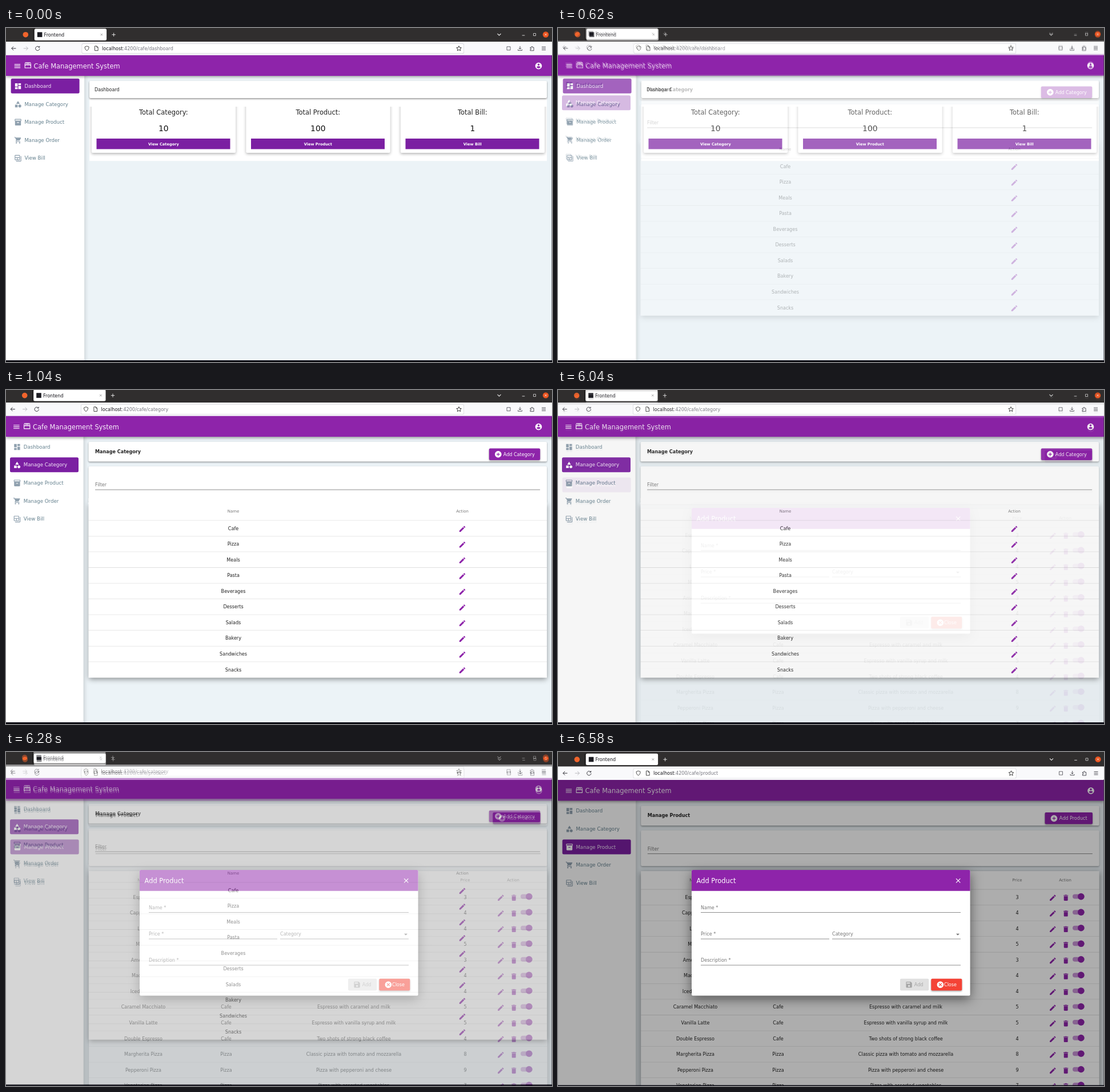
Recreate the animation shown at these times as an HTML page with a canvas. Size 956x586 px, loop 8000 ms.

```html
<!DOCTYPE html>
<html lang="en">
<head>
<meta charset="utf-8">
<title>Cafe Management System</title>
<style>
html, body { margin: 0; width: 100%; height: 100%; overflow: hidden; }
canvas { display: block; }
</style>
</head>
<body>
<canvas id="stage" width="956" height="586"></canvas>
<script>
const W = 956, H = 586, LOOP = 8000, STEP = 60, STEPS = 10;
const PURPLE = '#8e24aa', DEEP = '#7b1fa2', INK = 'rgba(0,0,0,.87)', HINT = 'rgba(0,0,0,.54)';
const ROW = 27.56;

// Icons on a 24 unit grid
const ROUND = 'M12 2C6.48 2 2 6.48 2 12s4.48 10 10 10 10-4.48 10-10S17.52 2 12 2z';
const CROSS = 'M19 6.41L17.59 5 12 10.59 6.41 5 5 6.41 10.59 12 5 17.59 6.41 19 12 13.41 17.59 19 19 17.59 13.41 12z';
const ICONS = {
  dashboard: 'M3 13h8V3H3zM3 21h8v-6H3zM13 21h8V11h-8zM13 3v6h8V3z',
  category: 'M12 2l-5.5 9h11zM3 13.5h8v8H3zM17.5 13a4.5 4.5 0 1 0 .01 0z',
  product: 'M20 2H4c-1 0-2 .9-2 2v3c0 .7.4 1.3 1 1.7V20c0 1.1 1.1 2 2 2h14c.9 0 2-.9 2-2V8.7c.6-.4 1-1 1-1.7V4c0-1.1-1-2-2-2zM15 14H9v-2h6zM20 7H4V4h16z',
  order: 'M7 18a2 2 0 1 0 .01 0zM17 18a2 2 0 1 0 .01 0zM1 2v2h2l3.6 7.6-1.35 2.4c-.7 1.4.3 3 1.75 3h12v-2H7.4l-.2-.4.9-1.6h7.45c.75 0 1.4-.4 1.75-1l3.6-6.5c.3-.7-.2-1.5-.9-1.5H5.2l-.9-2z',
  bill: 'M20 6v14H6v2h14c1.1 0 2-.9 2-2V6zM16 2H4c-1.1 0-2 .9-2 2v12c0 1.1.9 2 2 2h12c1.1 0 2-.9 2-2V4c0-1.1-.9-2-2-2zM9 16H4v-5h5zM16 16h-5v-5h5zM16 9H4V4h12z',
  account: ROUND + 'M12 5a3 3 0 1 1-.01 0zM12 19.2c-2.5 0-4.7-1.3-6-3.2 0-2 4-3.1 6-3.1s6 1.1 6 3.1c-1.3 1.9-3.5 3.2-6 3.2z',
  edit: 'M3 17.25V21h3.75L17.8 9.94l-3.75-3.75zM20.7 7c.4-.4.4-1 0-1.4l-2.3-2.3c-.4-.4-1-.4-1.4 0l-1.9 1.8 3.75 3.75z',
  trash: 'M6 19c0 1.1.9 2 2 2h8c1.1 0 2-.9 2-2V7H6zM19 4h-3.5l-1-1h-5l-1 1H5v2h14z',
  add: ROUND + 'M17 13h-4v4h-2v-4H7v-2h4V7h2v4h4z',
  cancel: ROUND + 'M17 15.6L15.6 17 12 13.4 8.4 17 7 15.6l3.6-3.6L7 8.4 8.4 7l3.6 3.6L15.6 7 17 8.4 13.4 12z',
  save: 'M17 3H5c-1.1 0-2 .9-2 2v14c0 1.1.9 2 2 2h14c1.1 0 2-.9 2-2V7zM12 19a3 3 0 1 1 .01 0zM15 9H5V5h10z',
  menu: 'M3 18h18v-2H3zM3 13h18v-2H3zM3 6v2h18V6z',
  close: CROSS
};
const LINES = {
  store: 'M4 3.5h16l1.5 6v11h-19v-11zM2.5 9.5q2.5 4 5 0q2.3 4 4.5 0q2.3 4 4.5 0q2.5 4 5 0M9 3.5l-1.5 6M12 3.5v6M15 3.5l1.5 6',
  back: 'M20 12H4M11 5l-7 7 7 7',
  forward: 'M4 12h16M13 5l7 7-7 7',
  reload: 'M18.5 7.5a8 8 0 1 0 1.5 5M19.5 3v5h-5',
  shield: 'M12 3l8 3c0 7-2 12-8 15c-6-3-8-8-8-15z',
  page: 'M6 3h8l5 5v13H6zM14 3v5h5',
  star: 'M12 3l2.7 6 6.3.6-4.8 4.3 1.5 6.4-5.7-3.4-5.7 3.4 1.5-6.4L3 9.600l6.300-.6z',
  square: 'M4 4h16v16H4z',
  download: 'M12 3v12M7 10l5 5 5-5M4 16v4h16v-4',
  puzzle: 'M5 8h5v-2a2 2 0 0 1 4 0v2h5v13H5v-5h2a2 2 0 0 0 0-4H5z',
  bars: 'M4 6h16M4 12h16M4 18h16',
  cross: 'M5 5l14 14M19 5L5 19',
  plus: 'M12 3v18M3 12h18',
  chevron: 'M4 8l8 8 8-8',
  dash: 'M4 17h16'
};

const NAV = [['dashboard', 'Dashboard'], ['category', 'Manage Category'], ['product', 'Manage Product'],
  ['order', 'Manage Order'], ['bill', 'View Bill']];
const CATEGORIES = ['Cafe', 'Pizza', 'Meals', 'Pasta', 'Beverages', 'Desserts', 'Salads', 'Bakery', 'Sandwiches', 'Snacks'];
const PRODUCTS = [
  ['Espresso', 3], ['Cappuccino', 4], ['Latte', 4], ['Mocha', 5], ['Americano', 3], ['Macchiato', 4], ['Iced Coffee', 4],
  ['Caramel Macchiato', 5, 'Cafe', 'Espresso with caramel and milk'],
  ['Vanilla Latte', 5, 'Cafe', 'Espresso with vanilla syrup and milk'],
  ['Double Espresso', 4, 'Cafe', 'Two shots of strong black coffee'],
  ['Margherita Pizza', 8, 'Pizza', 'Classic pizza with tomato and mozzarella'],
  ['Pepperoni Pizza', 9, 'Pizza', 'Pizza with pepperoni and cheese'],
  ['Vegetarian Pizza', 7, 'Pizza', 'Pizza with assorted vegetables']
];

let g;

function box(x, y, w, h, color, r = 0) {
  g.fillStyle = color;
  g.beginPath();
  g.roundRect(x, y, w, h, r);
  g.fill();
}

function raised(x, y, w, h, color, r, blur, drop, alpha) {
  g.save();
  g.shadowColor = `rgba(0,0,0,${alpha})`;
  g.shadowBlur = blur;
  g.shadowOffsetY = drop;
  box(x, y, w, h, color, r);
  g.restore();
}

function disc(x, y, r, color) {
  g.fillStyle = color;
  g.beginPath();
  g.arc(x, y, r, 0, 7);
  g.fill();
}

// y is the middle of the capitals
function text(s, x, y, size, color, align = 'left', weight = 400) {
  g.font = `${weight} ${size}px "DejaVu Sans", sans-serif`;
  g.textAlign = align;
  g.fillStyle = color;
  g.fillText(s, x, y + size * 0.36);
  return g.measureText(s).width;
}

function icon(name, x, y, color, size = 13.85, weight = 2) {
  g.save();
  g.translate(x, y);
  g.scale(size / 24, size / 24);
  g.translate(-12, -12);
  if (ICONS[name]) {
    g.fillStyle = color;
    g.fill(new Path2D(ICONS[name]), 'evenodd');
  } else {
    g.strokeStyle = color;
    g.lineWidth = weight;
    g.stroke(new Path2D(LINES[name]));
  }
  g.restore();
}

function rule(x, y, w, color = 'rgba(0,0,0,.12)') {
  box(x, y - 0.4, w, 0.8, color);
}

function button(x, y, w, label, name, gap) {
  raised(x, y, w, 20.5, PURPLE, 2, 3, 1.5, 0.35);
  icon(name, x + 16, y + 10.4, '#fff');
  text(label, x + gap, y + 10.2, 8.07, '#fff');
}

function browser(dx, dy, rx, path) {
  g.save();
  g.translate(0, dy);
  box(0, -5, W, 27.2, '#302e2e');
  box(0, 22, W, 23.4, '#f9f9fb');
  for (const [name, x, size] of [['chevron', 863.5, 9], ['dash', 906, 7], ['square', 925.5, 6]])
    icon(name, x + rx, 9.4, '#e8e8e8', size, 3);
  disc(945 + rx, 9.4, 5.2, '#e95420');
  icon('cross', 945 + rx, 9.4, '#fff', 6, 3);

  box(131 + dx, 25.2, 671 + rx - dx, 17.6, '#cfcfd6', 2.5);
  box(131.6 + dx, 25.8, 669.8 + rx - dx, 16.4, '#fff', 2);
  icon('star', 793 + rx, 33.7, '#333', 11.5);
  for (const [name, x] of [['square', 880], ['download', 900], ['puzzle', 921], ['bars', 941.5]])
    icon(name, x + rx, 33.7, '#3d3d45', name === 'square' ? 9 : 10.5);

  g.translate(dx, 0);
  box(46, 0, 0.7, 20, '#111');
  disc(32.7, 9.6, 4.8, '#f0642c');
  box(48.2, -0.8, 126.3, 20.4, '#fff', 2.5);
  box(53.2, 5.2, 8.6, 8.6, '#1c1c22');
  text('Frontend', 65, 9.7, 8.05, '#15141a');
  icon('cross', 165.8, 9.5, '#444', 6);
  icon('plus', 187, 9.6, '#eee', 8.5, 2.6);
  icon('back', 12, 33.7, '#2b2b33', 11.5);
  icon('forward', 33, 33.7, '#b5b5bb', 11.5);
  icon('reload', 53.7, 33.7, '#2b2b33', 11);
  icon('shield', 140, 33.6, '#333', 10.5);
  icon('page', 156.5, 33.6, '#333', 10.5);
  const w = text('localhost', 166.5, 33.7, 8.07, '#15141a');
  text(':4200/cafe/' + path, 166.5 + w, 33.7, 8.07, '#76767f');
  g.restore();
}

function frame(dx, dy, rx, active) {
  box(0, 0, W, H, '#ecf3f7');
  raised(-10, 40, 145.6 + dx, H, '#fff', 0, 8, 0, 0.22);
  NAV.forEach(([name, label], i) => {
    const y = 99.7 + dy + i * 31.6, on = i === active;
    if (on) box(7 + dx, y - 13, 120, 26, DEEP, 2.5);
    icon(name, 19.4 + dx, y + 0.3, on ? '#fff' : '#90a1af');
    text(label, 30.8 + dx, y, 8.64, on ? '#f4e8f8' : '#64808e');
  });
  raised(0, 45.3 + dy, W, 36.7, PURPLE, 0, 5, 2, 0.4);
  icon('menu', 18.3 + dx, 64.6 + dy, '#fff');
  icon('store', 36.7 + dx, 63.3 + dy, '#fff', 13);
  text('Cafe Management System', 47 + dx, 64.8 + dy, 11.42, '#f8effa');
  icon('account', 932.5 + rx, 64.4 + dy, '#fff');
}

function footer(y) {
  box(955.4, 48, 0.6, H, '#3a3a42');
  box(0, y, W, H - y, '#0b0b14');
}

function dashboard() {
  frame(1.6, 2.1, 0, 0);
  box(146, 100, 801, 133.3, '#fff');
  raised(146, 92.8, 801, 30.2, '#fff', 2, 3, 1.5, 0.45);
  text('Dashboard', 155, 107.8, 8.07, INK);
  g.save();
  g.beginPath();
  g.rect(146, 138, 801, 96);
  g.clip();
  [['Category', 10], ['Product', 100], ['Bill', 1]].forEach(([name, count], i) => {
    const x = 149.8 + i * 270.5, mid = x + 126;
    raised(x, 130, 252.4, 89, '#fff', 2, 5, 2, 0.3);
    text(`Total ${name}:`, mid, 148, 11.45, INK, 'center');
    text(count, mid, 175.8, 13.85, '#111', 'center');
    box(x + 8.7, 194, 234, 18.4, DEEP);
    text('View ' + name, mid, 203.3, 6.6, '#fff', 'center', 700);
  });
  g.restore();
  browser(1.6, 2.1, 0, 'dashboard');
  footer(583);
}

function listTop(x, y, title) {
  raised(x, 91 + y, 802.5, 34.6, '#fff', 2, 3, 1.3, 0.38);
  raised(x, 134 + y, 802.5, 62.6, '#fff', 2, 3, 1.3, 0.3);
  text(title, x + 11.6, 108 + y, 8.07, INK, 'left', 700);
  text('Filter', x + 11.6, 166.2 + y, 8.07, HINT);
  rule(x + 11.6, 175 + y, 779, 'rgba(0,0,0,.45)');
}

function categories() {
  frame(0, 0, 0, 1);
  listTop(144.5, 0, 'Manage Category');
  button(845.8, 102.4, 89.4, 'Add Category', 'add', 25);
  raised(144.5, 196.7, 802.5, 308, '#fff', 0, 9, 3, 0.42);
  box(144.5, 190, 802.5, 10, '#fff');
  text('Name', 398, 213, 6.92, HINT, 'center');
  text('Action', 799, 213, 6.92, HINT, 'center');
  CATEGORIES.forEach((name, i) => {
    const y = 242.6 + i * ROW;
    rule(144.5, y - 13.8, 802.5);
    text(name, 398, y, 8.07, INK, 'center');
    icon('edit', 799, y + 1.2, PURPLE);
  });
  browser(0, 0, 0, 'category');
  footer(583);
}

function field(label, x, y, w) {
  text(label, x, y, 8.07, HINT);
  rule(x, y + 8.5, w, 'rgba(0,0,0,.45)');
}

function dialog() {
  raised(234, 207, 487.6, 220.5, '#fff', 2, 20, 6, 0.5);
  box(234, 207, 487.6, 36.7, PURPLE, [2, 2, 0, 0]);
  text('Add Product', 242.6, 225.5, 11.4, '#fff');
  icon('close', 700.7, 225.7, '#fff');
  field('Name *', 250, 273, 455);
  field('Price *', 250, 319.5, 225);
  field('Category', 480, 319.5, 225);
  field('Description *', 250, 365.5, 455);
  g.fillStyle = HINT;
  g.fill(new Path2D('M697 318.7h6l-3 3z'));
  box(599, 397.8, 50.3, 20.6, '#e0e0e0', 2);
  icon('save', 614.6, 408.2, '#a6a6a6');
  text('Add', 623.8, 408, 8.07, '#a6a6a6');
  raised(653.3, 397.8, 54, 20.6, '#f44336', 2, 3, 1.5, 0.35);
  icon('cancel', 669.4, 408.2, '#fff');
  text('Close', 676, 408, 8.07, '#fff');
}

function products() {
  frame(0.6, 3.5, 0.5, 2);
  listTop(145.2, 3.5, 'Manage Product');
  button(852.5, 106, 83.5, 'Add Product', 'add', 25.3);
  raised(145.2, 209, 802.5, 400, '#fff', 0, 9, 3, 0.42);
  const cols = [['Name', 240.5], ['Category', 385.5], ['Description', 609], ['Price', 804], ['Action', 888]];
  for (const [label, x] of cols) text(label, x, 225, 6.92, HINT, 'center');
  PRODUCTS.forEach(([name, price, kind = 'Cafe', about = ''], i) => {
    const y = 254.6 + i * ROW;
    rule(145.2, y - 13.6, 802.5);
    [name, kind, about, price].forEach((s, c) => text(s, cols[c][1], y, 8.07, INK, 'center'));
    icon('edit', 866.3, y + 1.2, PURPLE);
    icon('trash', 889.2, y + 1.2, PURPLE);
    box(901, y - 5, 20.6, 8, '#c792d5', 4);
    disc(915.8, y - 1, 5.8, PURPLE);
  });
  box(0, 48.8, W, H, 'rgba(0,0,0,.32)');
  dialog();
  browser(0.6, 3.5, 0.5, 'product');
  footer(584.6);
}

function render(draw) {
  const c = document.createElement('canvas');
  c.width = W;
  c.height = H;
  g = c.getContext('2d');
  draw();
  return c;
}

const scenes = [dashboard, categories, products].map(render);
const fades = [500, 6040];
const stage = document.getElementById('stage').getContext('2d');

function blend(t, start) {
  return t < start ? 0 : Math.min(1, (Math.floor((t - start) / STEP) + 1) / STEPS);
}

function tick() {
  const t = performance.now() % LOOP;
  stage.globalAlpha = 1;
  stage.drawImage(scenes[0], 0, 0);
  fades.forEach((start, i) => {
    stage.globalAlpha = blend(t, start);
    stage.drawImage(scenes[i + 1], 0, 0);
  });
  requestAnimationFrame(tick);
}
tick();
</script>
</body>
</html>
```
